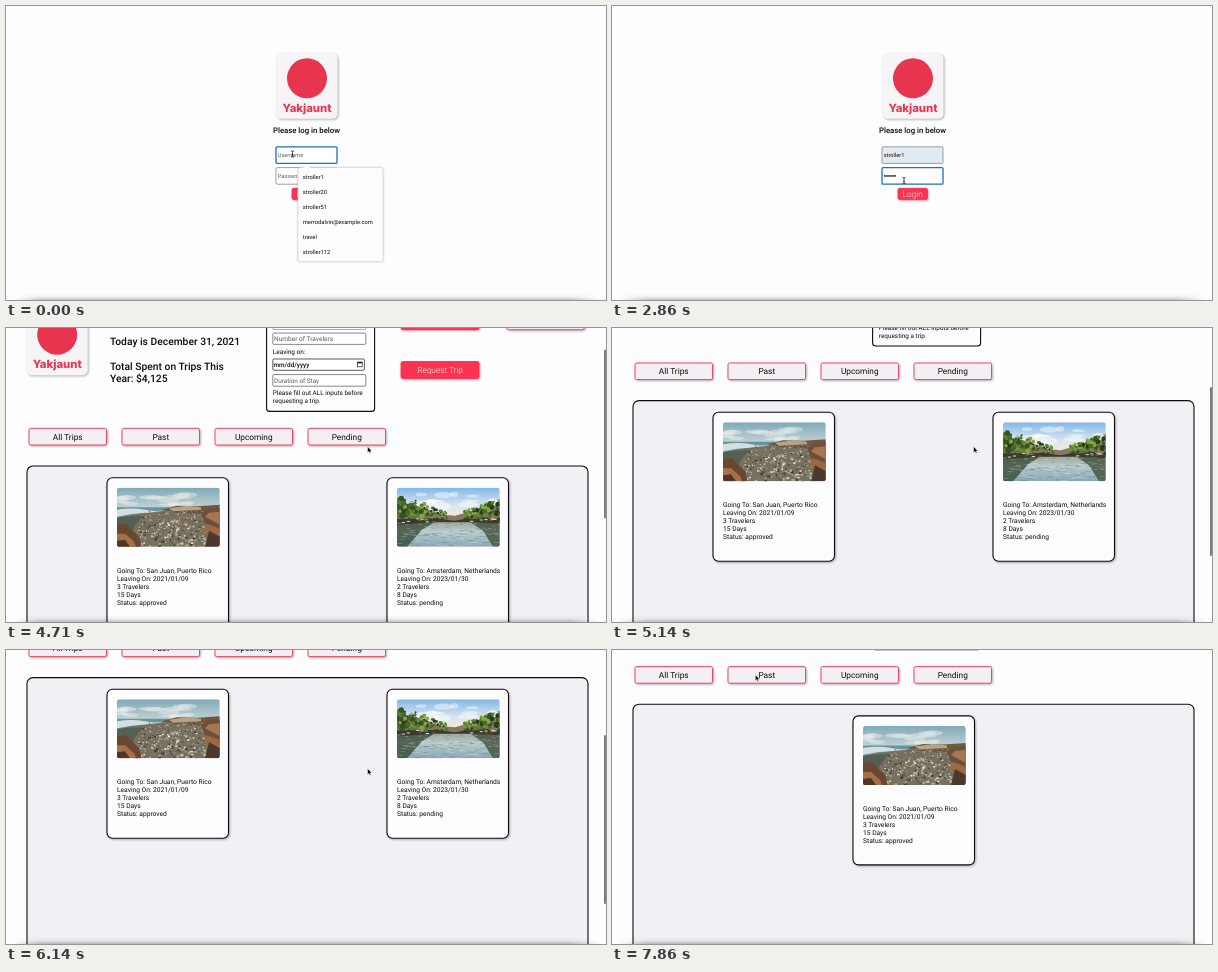
These frames come from a looping animation (600 px wide and 294 px high, 8000 ms). An HTML page:

```html
<!DOCTYPE html>
<html lang="en">
<head>
<meta charset="utf-8">
<title>Trip planner walkthrough</title>
<style>
html, body { margin: 0; width: 100%; height: 100%; overflow: hidden; background: #fdfcfe; }
svg { display: block; width: 100vw; height: 100vh; }
text { font-family: Roboto, sans-serif; white-space: pre; text-rendering: geometricPrecision; }
.sh { filter: drop-shadow(1.3px 1.5px 1px rgba(0,0,0,.3)); }
.soft { filter: drop-shadow(.4px .7px .8px rgba(0,0,0,.18)); }
</style>
</head>
<body>
<svg id="stage" viewBox="0 0 600 294"></svg>
<script>
const LOOP = 8000, FPS = 7;
const RED = '#fa3352', MARK = '#e8354f', INK = '#0c0c0c', HINT = '#5c5c5c', PANEL = '#f2f0f4', PAGE = '#fdfcfe';

function rect(x, y, w, h, fill, o = '') {
  return `<rect x="${x}" y="${y}" width="${w}" height="${h}" fill="${fill}" ${o}/>`;
}
function text(x, y, size, str, o = '') {
  return `<text x="${x}" y="${y}" font-size="${size}" fill="${INK}" ${o}>${str}</text>`;
}
const group = (id, body, o = '') => `<g id="${id}" ${o}>${body}</g>`;
const path = (d, fill, o = '') => `<path d="${d}" fill="${fill}" ${o}/>`;

function random(seed) {
  return () => (seed = (seed * 16807) % 2147483647) / 2147483647;
}

function logo(x, y) {
  return `<g transform="translate(${x} ${y})">` +
    rect(0, 0, 61, 65.5, '#f6f4f6', 'rx="5" class="sh"') +
    `<circle cx="30.5" cy="25" r="20" fill="${MARK}"/>` +
    text(30.5, 58.6, 11.3, 'Yakjaunt', `style="fill:${MARK};font-family:Inter,sans-serif" font-weight="800" text-anchor="middle"`) +
    '</g>';
}

function button(x, y, w, h, label, solid) {
  return rect(x, y, w, h, solid ? RED : PANEL, `rx="1.8" stroke="${RED}" stroke-width=".9" class="sh"`) +
    text(x + w / 2, y + h / 2 + 3, 8.3, label,
      `font-weight="${solid ? 300 : 400}" text-anchor="middle" ${solid ? 'style="fill:#fff"' : ''}`);
}

function field(x, y, w, h, id = '', line = '#6a6a6a') {
  return rect(x, y, w, h, '#fff', `id="${id}" rx="1.2" stroke="${line}" stroke-width=".8"`);
}

function cemetery() {
  const r = random(41);
  let s = rect(0, 0, 103, 59, 'url(#sjSky)');
  for (let i = 0; i < 18; i++) {
    s += `<ellipse cx="${r() * 75}" cy="${7 + r() * 10}" rx="${4 + r() * 9}" ry="${.8 + r() * 1.8}" fill="#eceeec" opacity=".5"/>`;
  }
  s += path('M0 19.5H52L60 30H0Z', '#66949c') +
    path('M0 22Q14 19.5 28 22T46 22L40 26Q20 24 0 29Z', '#e6eeec', 'opacity=".85"') +
    path('M0 30L22 26L48 23L103 25V59H0Z', '#77705f') +
    path('M44 22L60 18L80 18.5L103 17V27L60 25Z', '#72573f') +
    path('M52 20.5L70 18L84 19.5V22L56 23.5Z', '#b3a48c');
  for (let i = 0; i < 420; i++) {
    const d = r(), y = 23 + d * 35, c = 45 + r() * 200, k = .5 + d * .7;
    const x = 27 - d * 14 + r() * (62 + d * 12);
    s += rect(x.toFixed(1), y.toFixed(1), ((.8 + r() * 2.2) * k).toFixed(1), ((.7 + r() * 1.5) * k).toFixed(1),
      `rgb(${c | 0},${c * .96 | 0},${c * .86 | 0})`);
  }
  return s +
    path('M0 30L10 28.5L26 28L18 38L14 46L0 44Z', '#566052') +
    path('M0 37L9 36L22 49L25 59H17L11 48L0 46Z', '#6a4733') +
    path('M0 46L8 46L17 54L19 59H0Z', '#a86f45') +
    path('M0 53L8 52L13 59H0Z', '#4c382b') +
    path('M103 20L91 21L84 26L88 36L103 44Z', '#6d503b') +
    path('M103 24L92 25L88 29L103 37Z', '#a87651') +
    path('M103 41L90 36L87 41L94 52L103 57Z', '#9d6844') +
    path('M103 49L92 43L88 59H103Z', '#4d382d');
}

function canal() {
  const r = random(77);
  let s = rect(0, 0, 103, 59, 'url(#amSky)');
  for (let i = 0; i < 16; i++) {
    s += `<ellipse cx="${24 + r() * 72}" cy="${5 + r() * 14}" rx="${4 + r() * 8}" ry="${1.2 + r() * 2.3}" fill="#fff" opacity=".45"/>`;
  }
  s += path('M0 14L20 18L46 27L58 28L72 24L88 20L103 17V35H0Z', '#8a7762') +
    rect(0, 34, 103, 25, 'url(#amWater)');
  const greens = ['#35521f', '#55802a', '#83a83f', '#28391d', '#46682a'];
  for (let i = 0; i < 210; i++) {
    const left = i % 2, u = r();
    const x = left ? u * 50 : 103 - u * 37;
    const top = left ? 5 + u * 20 : 10 + u * 14;
    s += `<circle cx="${x.toFixed(1)}" cy="${(top + r() * (32 - top)).toFixed(1)}" r="${(.8 + r() * 2.2 * (1.2 - u)).toFixed(1)}" fill="${greens[r() * 5 | 0]}"/>`;
  }
  s += path('M0 31H44L57 33L70 31H103V36L72 34.5H38L0 37Z', '#383b30') +
    path('M0 36L38 34L25 42L10 59H0Z', '#33442f', 'opacity=".75"') +
    path('M103 36L73 34L86 43L96 59H103Z', '#3b4a33', 'opacity=".75"');
  for (let i = 0; i < 150; i++) {
    const d = r();
    s += rect((r() * 100).toFixed(1), (35 + d * 23).toFixed(1), (1 + r() * 3 + d * 4).toFixed(1), .5,
      i % 2 ? '#eef3f1' : '#405447', 'opacity=".42"');
  }
  for (let i = 0; i < 18; i++) {
    const x = i % 2 ? r() * 36 : 72 + r() * 27;
    s += rect(x.toFixed(1), (30.5 + r() * 4).toFixed(1), 3.2, 1, i % 3 ? '#ddd7c8' : '#8c503b');
  }
  return s;
}

function card(id, x, photo, lines) {
  return group(id,
    rect(0, 0, 121.5, 149, PAGE, `rx="5.5" stroke="${INK}" stroke-width="1.1" class="sh"`) +
    `<g transform="translate(10 10)" clip-path="url(#photo)">${photo}</g>` +
    lines.map((s, i) => text(10, 94.9 + i * 8, 6.67, s)).join(''),
    `transform="translate(${x} 185.3)"`);
}

const users = ['stroller1', 'stroller20', 'stroller51', 'merrodalvin@example.com', 'travel', 'stroller112'];

const loginPage =
  logo(270.5, 47.3) +
  text(300.5, 127.3, 7.75, 'Please log in below', 'font-weight="500" text-anchor="middle"') +
  field(270, 140.8, 61, 16.6, 'userBox') + text(271.8, 151, 5.6, '', 'id="user"') +
  field(270, 161.6, 61, 16.6, 'passBox') + text(271.8, 171.7, 5.6, 'Password', `id="pass" style="fill:${HINT}"`) +
  '<g id="dots"></g>' +
  button(286, 182.3, 29.5, 11.3, 'Login', true) +
  group('menu',
    rect(292, 161.6, 85, 94, PAGE, 'rx="1.8" stroke="#d2d2d5" stroke-width=".6" class="soft"') +
    path('M297.5 162L301 159L304.5 162Z', PAGE) +
    rect(292.3, 163.5, 84.4, 15, '#e8e8ea', 'id="pick"') +
    users.map((s, i) => text(296.8, 172.9 + i * 15.05, 5.75, s)).join(''));

const dashboard =
  logo(20.7, 17.3) +
  text(104, 27, 10.4, 'Welcome, Mab Dorvenhale!', `style="fill:${MARK}"`) +
  text(104, 52.9, 10.3, 'Today is December 31, 2021', 'font-weight="500"') +
  text(104, 77.7, 10.3, 'Total Spent on Trips This', 'font-weight="500"') +
  text(104, 89.9, 10.3, 'Year: $4,125', 'font-weight="500"') +
  rect(260.6, 17.6, 108, 101.4, PAGE, `rx="3" stroke="${INK}" stroke-width="1.1"`) +
  field(266.8, 27.3, 93, 9.8, '', '#999') + text(268, 34.4, 6.1, 'Select a Destination', 'font-weight="500"') +
  path('M354.8 31.4L356.2 32.9L357.6 31.4', 'none', 'stroke="#222" stroke-width=".7"') +
  field(266.8, 40.7, 93, 11.3) + text(268, 48.8, 6.55, 'Number of Travelers', `style="fill:${HINT}"`) +
  text(266.8, 61.5, 6.45, 'Leaving on:') +
  field(266.8, 66.6, 91.6, 11.3, '', '#333') + text(267.4, 74.6, 6.4, 'mm/dd/yyyy', 'font-weight="500"') +
  rect(351.6, 69.8, 4.6, 4.6, 'none', 'stroke="#222" stroke-width=".7"') + rect(351.6, 69.4, 4.6, 1.6, '#222') +
  field(266.8, 82.2, 93, 11.6) + text(268, 90.3, 6.35, 'Duration of Stay', `style="fill:${HINT}"`) +
  text(266.8, 103.1, 6.4, 'Please fill out ALL inputs before') +
  text(266.8, 111, 6.4, 'requesting a trip.') +
  button(395, 20.3, 78, 17, 'Get Total Cost', true) +
  button(395, 69.1, 78, 17, 'Request Trip', true) +
  button(500.7, 20.3, 77.5, 17, 'Log Out') +
  ['All Trips', 'Past', 'Upcoming', 'Pending'].map((s, i) => button(23 + i * 93, 136, 77.5, 16.6, s)).join('') +
  rect(21, 173.6, 561, 300, PANEL, `rx="6" stroke="${INK}" stroke-width="1.1"`) +
  card('past', 101, cemetery(), ['Going To: San Juan, Puerto Rico', 'Leaving On: 2021/01/09', '3 Travelers', '15 Days', 'Status: approved']) +
  card('pending', 381, canal(), ['Going To: Amsterdam, Netherlands', 'Leaving On: 2023/01/30', '2 Travelers', '8 Days', 'Status: pending']);

function gradient(id, stops, o = 'x2="0" y2="1"') {
  return `<linearGradient id="${id}" ${o}>` + stops.map(([at, c, a = 1]) =>
    `<stop offset="${at}" stop-color="${c}" stop-opacity="${a}"/>`).join('') + '</linearGradient>';
}

const stage = document.getElementById('stage');
stage.innerHTML = '<defs>' +
  gradient('sjSky', [[0, '#7fa9b8'], [.35, '#c3d3d5'], [1, '#c3d1d2']]) +
  gradient('amSky', [[0, '#82b7e8'], [.3, '#d9e5ee'], [.52, '#f8ecd4']]) +
  gradient('amWater', [[0, '#9aa69a'], [.4, '#b9cbcd'], [1, '#86a7b4']]) +
  gradient('edge', [[0, '#000', 0], [.55, '#000', .05], [1, '#000', .24]]) +
  gradient('sides', [[0, '#000'], [.05, '#fff'], [.95, '#fff'], [1, '#000']], 'x2="1" y2="0"') +
  '<mask id="fade">' + rect(6, 280, 588, 14, 'url(#sides)') + '</mask>' +
  '<clipPath id="photo">' + rect(0, 0, 102.6, 59, '#000', 'rx="2.5"') + '</clipPath></defs>' +
  rect(0, 0, 600, 294, PAGE) +
  group('login', loginPage) + group('dash', dashboard) +
  rect(598, 0, 2, 169, '#7c7c7e', 'id="thumb" rx="1"') +
  rect(6, 287, 588, 7, 'url(#edge)', 'mask="url(#fade)"') +
  group('cursor',
    path('M0 0V6.2L1.5 4.9L2.5 7.1L3.5 6.6L2.6 4.5H4.5Z', '#000', 'id="arrow" stroke="#fff" stroke-width=".5"') +
    path('M-1.4 -3.2Q0 -3.2 0 -2.2Q0 -3.2 1.4 -3.2M0 -2.2V2.2M-1.4 3.2Q0 3.2 0 2.2Q0 3.2 1.4 3.2M-.7 .9H.7', 'none', 'id="beam" stroke="#111" stroke-width=".75"'));

const el = {};
stage.querySelectorAll('[id]').forEach(e => el[e.id] = e);
const show = (e, on) => e.setAttribute('display', on ? 'inline' : 'none');
const attr = (e, o) => Object.entries(o).forEach(([k, v]) => e.setAttribute(k, v));

// Eased interpolation through rows of [time, ...values].
function track(rows, t) {
  let i = rows.findIndex(row => row[0] > t);
  if (i < 0) return rows[rows.length - 1].slice(1);
  if (i === 0) return rows[0].slice(1);
  const a = rows[i - 1], b = rows[i], u = (t - a[0]) / (b[0] - a[0]), k = u * u * (3 - 2 * u);
  return a.slice(1).map((v, j) => v + (b[j + 1] - v) * k);
}

const pointer = [
  [0, 286.5, 148], [430, 301, 170], [1000, 301, 171], [1200, 292, 174.5],
  [2860, 292, 174.5], [3140, 300, 188], [3500, 300, 188], [4000, 330.7, 114],
  [4200, 330.7, 114], [4570, 361.5, 118.5], [6430, 361.5, 118.5], [7000, 80.5, 20.5],
  [7280, 80.5, 20.5], [7570, 143.3, 24.7]
];
const scrolling = [[4430, 0], [5140, 101], [5710, 146], [6140, 146], [6640, 119.4]];

function focusBox(box, on, fill) {
  attr(box, { stroke: on ? '#1a6fc4' : '#777', 'stroke-width': on ? 1.3 : .7, fill });
}

function render(t) {
  const picked = t >= 710, inPass = t >= 1140, home = t >= 3420, onlyPast = t >= 7700;
  show(el.login, !home);
  show(el.dash, home);

  focusBox(el.userBox, !inPass, picked ? '#e1ecf2' : '#fff');
  focusBox(el.passBox, inPass, '#fff');
  el.user.textContent = picked ? users[0] : 'Username';
  el.user.style.fill = picked ? INK : HINT;
  show(el.menu, !picked);
  show(el.pick, t >= 400);

  const typed = Math.max(0, Math.min(6, Math.floor((t - 1420) / 143) + 1));
  show(el.pass, !typed);
  el.dots.innerHTML = Array.from({ length: typed }, (_, i) =>
    `<circle cx="${272.9 + i * 2.05}" cy="169.9" r=".85" fill="${INK}"/>`).join('');

  const [y] = track(scrolling, t);
  attr(el.dash, { transform: `translate(0 ${-y})` });
  attr(el.past, { transform: `translate(${onlyPast ? 241 : 101} 185.3)` });
  show(el.pending, !onlyPast);
  attr(el.thumb, { y: 1 + y * .575, opacity: t < 4430 ? 0 : Math.max(0, Math.min(1, (7500 - t) / 250)) });

  const [cx, cy] = track(pointer, t);
  const beam = !home && cx < 331 && cy < 179 && (picked || cy < 160);
  attr(el.cursor, { transform: `translate(${cx} ${cy})` });
  show(el.beam, beam);
  show(el.arrow, !beam);
}

function tick() {
  const t = performance.now() % LOOP;
  render(Math.floor((t + 5) * FPS / 1000) % (LOOP * FPS / 1000) * 1000 / FPS);
  requestAnimationFrame(tick);
}
tick();
</script>
</body>
</html>
```
